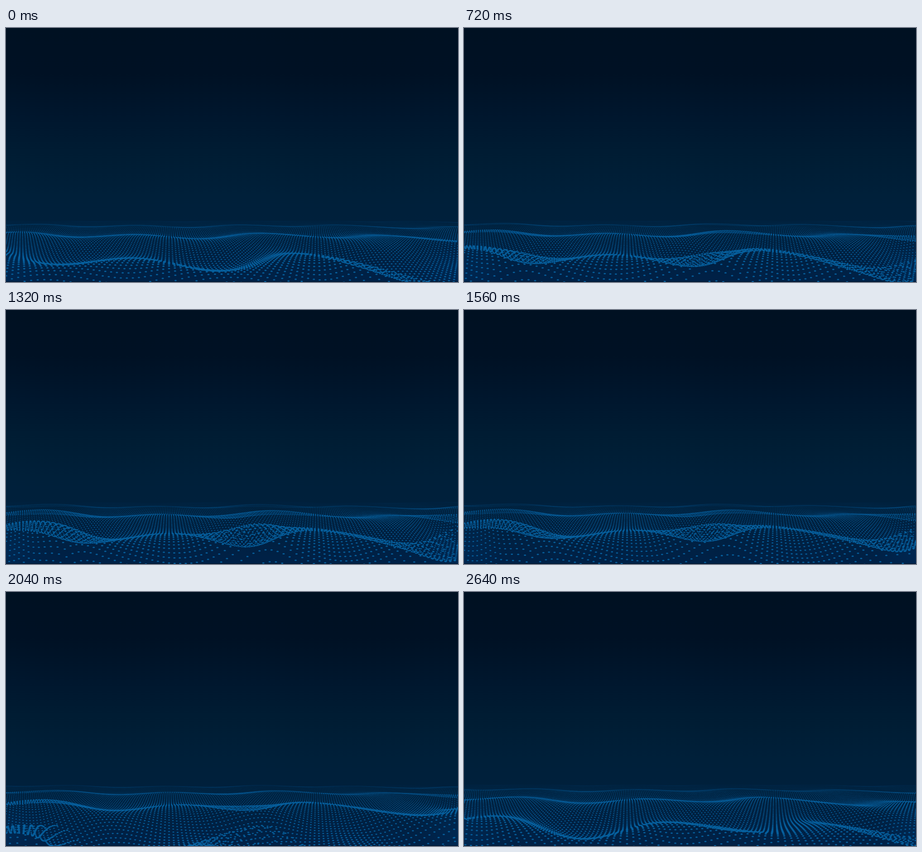
An HTML page with a canvas for the animation above (2.7 s loop, 998 by 561 pixels).

```html
<!DOCTYPE html>
<html lang="en">
<head>
<meta charset="utf-8">
<title>Dot waves</title>
<style>
  html, body { margin: 0; height: 100%; overflow: hidden; background: #001122; }
  canvas { display: block; }
</style>
</head>
<body>
<canvas id="stage" width="998" height="561"></canvas>
<script>
const W = 998, H = 561, LOOP = 2700, STEP = 60, TAU = 2 * Math.PI;
const ctx = document.getElementById('stage').getContext('2d');

// Perspective grid: depth is a row's distance below the horizon on screen,
// its reciprocal is the distance from the viewer.
const HORIZON = 390, CENTER_X = 360, NEAR = 300, FAR = 37;
const ROW_STEP = 0.00023, COLUMN_STEP = 0.075;

// Swells recede from the viewer by one wavelength per loop.
const FIRST_CREST = 0.0065, WAVELENGTH = 0.0067;

const clamp = (v, lo, hi) => Math.min(hi, Math.max(lo, v));
const cycle = turns => Math.cos(TAU * turns);

// How far a crest bends away from a straight line, in wavelengths.
function meander(x, depth, t) {
  const ripple = 33 * Math.sqrt(depth);
  return 0.1 - 0.2 * (x / W) ** 2
    + 0.1 * cycle((x - 650) / 640)
    + 0.15 * cycle((x - 290) / ripple - 0.4 * t)
    + 0.15 * cycle(t);
}

// Above 1 the surface folds over itself along the crest.
function steepness(x, t) {
  const swell = (0.5 + 0.5 * cycle((x - 560) / 470)) ** 2;
  return 1 + 1.8 * swell * Math.sin(Math.PI * t) ** 2;
}

function surfaceY(x, depth, t) {
  const phase = (1 / depth - FIRST_CREST) / WAVELENGTH - t - meander(x, depth, t);
  const height = steepness(x, t) * depth ** 2 * WAVELENGTH / TAU;
  return HORIZON + depth + height * Math.sin(TAU * phase);
}

function drawBackground() {
  const sky = ctx.createLinearGradient(0, 0, 0, H);
  [[0, '#001122'], [100, '#001124'], [200, '#00172e'], [290, '#001d34'],
   [370, '#00203a'], [440, '#00203c'], [H, '#002147']]
    .forEach(([y, color]) => sky.addColorStop(y / H, color));
  ctx.fillStyle = sky;
  ctx.fillRect(0, 0, W, H);
  for (const x of [0, W]) {
    const glow = ctx.createRadialGradient(x, 530, 0, x, 530, 90);
    glow.addColorStop(0, 'rgba(0,65,130,.2)');
    glow.addColorStop(1, 'rgba(0,65,130,0)');
    ctx.fillStyle = glow;
    ctx.fillRect(0, 437, W, H - 437);
  }
  ctx.fillStyle = '#001226';
  ctx.fillRect(0, H - 1, W, 1);
}

function drawRow(depth, t) {
  const gap = depth * COLUMN_STEP;
  const rx = clamp(depth * 0.017, 0.8, 2.6), ry = rx * 0.58;
  ctx.globalAlpha = clamp((depth - 35) / 42, 0.04, 0.95);
  ctx.beginPath();
  for (let x = CENTER_X % gap; x < W; x += gap) {
    const y = surfaceY(x, depth, t);
    if (y > H + 3) continue;
    ctx.moveTo(x + rx, y);
    ctx.ellipse(x, y, rx, ry, 0, 0, TAU);
  }
  ctx.fill();
}

function frame(now) {
  const t = Math.floor(now % LOOP / STEP) * STEP / LOOP;
  ctx.globalAlpha = 1;
  drawBackground();
  ctx.fillStyle = '#07609f';
  for (let z = 1 / NEAR; z < 1 / FAR; z += ROW_STEP) drawRow(1 / z, t);
  requestAnimationFrame(frame);
}
requestAnimationFrame(frame);
</script>
</body>
</html>
```
